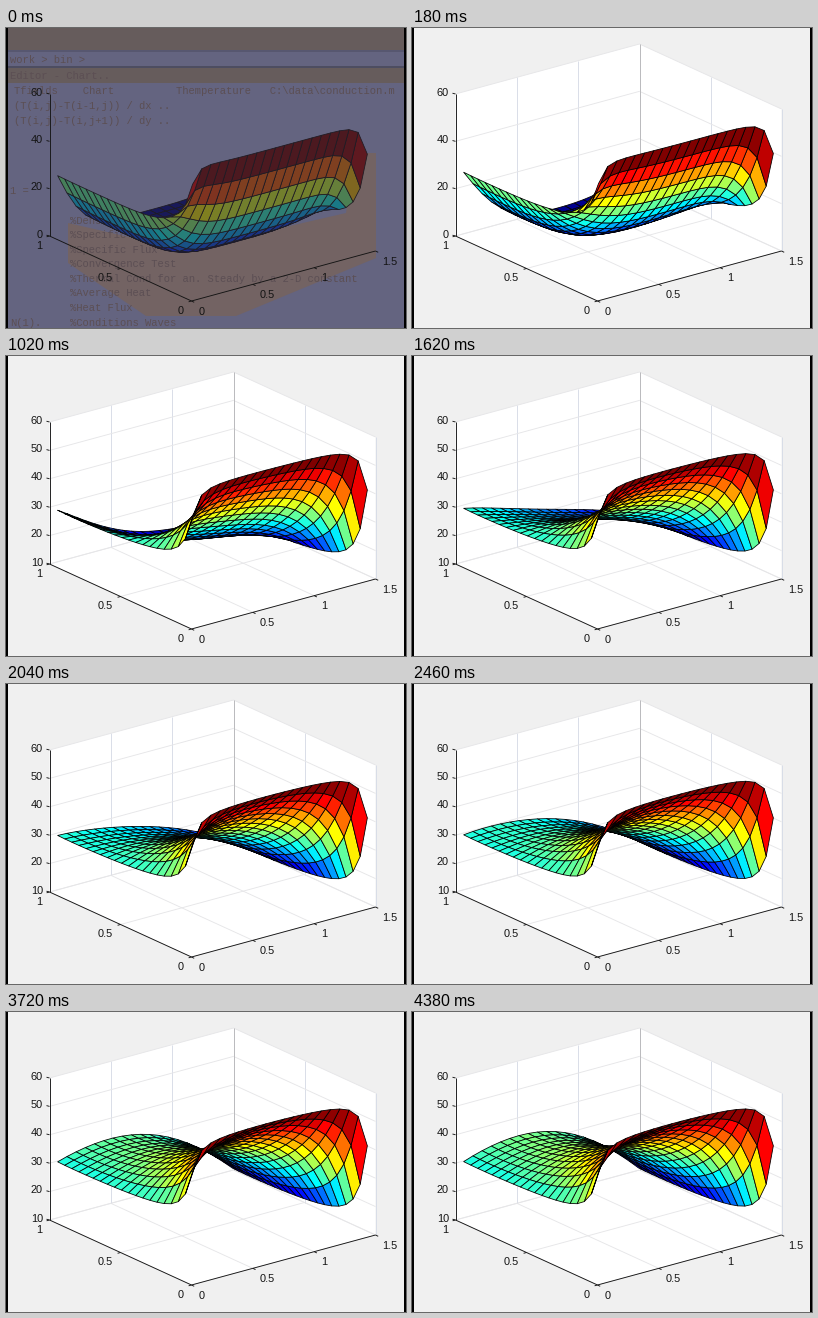
These frames come from a looping animation (400 px wide and 300 px high, 5.11 s). A matplotlib script:

```python
import numpy as np
import matplotlib.pyplot as plt
from matplotlib.animation import FuncAnimation
from matplotlib.collections import LineCollection, PolyCollection
from matplotlib.patches import Polygon, Rectangle

W, H, DPI = 400, 300, 100
LOOP_MS, TICK_MS, STEP_MS = 5110, 10, 60
STEPS = 74
PX = 72 / DPI

# Heat conduction in a 1.5 x 1 plate, cell-centred grid
N = 20
LX, LY = 1.5, 1.0
DX, DY = LX / N, LY / N
LEFT, RIGHT, FRONT, BACK_FLUX = 30, 10, 60, 4
SUBSTEPS, WARMUP = 20, 56
DT = 0.0071 / SUBSTEPS

xs = (np.arange(N) + 0.5) * DX
ys = (np.arange(N) + 0.5) * DY
X, Y = np.meshgrid(xs, ys, indexing="ij")


def diffuse(T, count):
    for _ in range(count):
        P = np.pad(T, 1)
        P[0, 1:-1] = 2 * LEFT - T[0]
        P[-1, 1:-1] = 2 * RIGHT - T[-1]
        P[1:-1, 0] = 2 * FRONT - T[:, 0]
        P[1:-1, -1] = T[:, -1] + BACK_FLUX * DY
        T = T + DT * ((P[2:, 1:-1] - 2 * T + P[:-2, 1:-1]) / DX**2
                      + (P[1:-1, 2:] - 2 * T + P[1:-1, :-2]) / DY**2)
    return T


def project(x, y, h=0):
    """Stage pixels; h is the height as a share of the z axis."""
    return np.stack(np.broadcast_arrays(
        185.5 + 184 * x / LX - 142 * y,
        273 - 50 * x / LX - 65 * y - 142 * h), axis=-1)


def jet(v):
    v = (np.minimum(np.floor(v * 64), 63) + 1) / 64
    return np.stack([np.clip(1.5 - abs(4 * v - c), 0, 1) for c in (3, 2, 1)], axis=-1)


def surface(T):
    low = 10 if T.min() > 9.5 else 0
    P = project(X, Y, (T - low) / (60 - low))
    quads = np.stack([P[:-1, :-1], P[1:, :-1], P[1:, 1:], P[:-1, 1:]], axis=2)
    colors = jet((T - T.min()) / (T.max() - T.min()))[:-1, :-1]
    # Far cells first
    return low, quads.reshape(-1, 4, 2)[::-1], colors.reshape(-1, 3)[::-1]


surfaces = []
field = diffuse(np.zeros((N, N)), WARMUP)
for _ in range(STEPS):
    surfaces.append(surface(field))
    field = diffuse(field, SUBSTEPS)

fig = plt.figure(figsize=(W / DPI, H / DPI), dpi=DPI)
ax = fig.add_axes([0, 0, 1, 1])
ax.set_xlim(0, W)
ax.set_ylim(H, 0)
ax.axis("off")

GRAY = (0.94, 0.94, 0.94)
DIM = np.array([100, 100, 128]) / 255
BROWN = (0.40, 0.36, 0.36)
GHOST = (0.36, 0.31, 0.33)
INK = (0.08, 0.08, 0.08)
GRID = (0.90, 0.90, 0.91)
UPRIGHT = (0.84, 0.86, 0.90)


def label(x, y, text, align):
    return ax.text(x, y, text, ha=align, va="center_baseline", color=INK,
                   family="Liberation Sans", size=11 * PX, zorder=6)


def lines(segments, color, zorder):
    return ax.add_collection(LineCollection(
        segments, colors=[color], linewidths=0.9 * PX, zorder=zorder))


def segment(a, b):
    return [project(*a), project(*b)]


backdrop = ax.add_patch(Rectangle((0, 0), W, H, color=GRAY, lw=0, zorder=0))
outline = [(0, 1, 0), (0, 1, 1), (LX, 1, 1), (LX, 0, 1), (LX, 0, 0), (0, 0, 0)]
pane = ax.add_patch(Polygon([project(*p) for p in outline], color="white", lw=0, zorder=1))
for x in (0, W - 2):
    ax.add_patch(Rectangle((x, 0), 2, H, color="black", lw=0, zorder=7))

floor, uprights = [], []
ticks = [segment((0, 1, 0), (0, 1, 1)), segment((0, 0, 0), (0, 1, 0)),
         segment((0, 0, 0), (LX, 0, 0))]
for x in (0.0, 0.5, 1.0, 1.5):
    floor.append(segment((x, 0, 0), (x, 1, 0)))
    uprights.append(segment((x, 1, 0), (x, 1, 1)))
    p = project(x, 0)
    ticks.append([p, p + (2.7, 1.3)])
    label(p[0] + 7, p[1] + 9.8, f"{x:g}", "left")
for y in (0.0, 0.5, 1.0):
    floor.append(segment((0, y, 0), (LX, y, 0)))
    uprights.append(segment((LX, y, 0), (LX, y, 1)))
    p = project(0, y)
    ticks.append([p, p + (-2.9, 0.8)])
    label(p[0] - 7.5, p[1] + 8.8, f"{y:g}", "right")
corner = segment((LX, 1, 0), (LX, 1, 1))
plot_only = [pane, lines(floor, GRID, 2), lines(uprights, UPRIGHT, 2),
             lines([corner], (0.72, 0.72, 0.73), 2.5)]
lines(ticks, INK, 3)

scales = {}
for low, values in ((0, range(0, 61, 20)), (10, range(10, 61, 10))):
    levels, marks, texts = [], [], []
    for value in values:
        h = (value - low) / (60 - low)
        levels += [segment((0, 1, h), (LX, 1, h)), segment((LX, 1, h), (LX, 0, h))]
        p = project(0, 1, h)
        marks.append([p, p + (-3, -0.8)])
        texts.append(label(37, p[1] - 2.5, str(value), "right"))
    scales[low] = (lines(levels, GRID, 2), [lines(marks, INK, 3)] + texts)

# Faint editor window behind the opening picture
ghosts = [ax.add_patch(Rectangle((0, y), W, h, color=c, lw=0, zorder=1))
          for y, h, c in ((0, 22, BROWN), (22, 2, (0.34, 0.34, 0.44)),
                          (38, 2, (0.30, 0.30, 0.38)), (40, 15, BROWN))]
shade = [(370, 125), (370, 230), (230, 288), (140, 288), (62, 235), (62, 195),
         (180, 222), (340, 185), (350, 125)]
ghosts.append(ax.add_patch(Polygon(shade, color=(0.45, 0.39, 0.39), lw=0, zorder=1)))
editor = [
    (4, 32, "work > bin >"), (4, 48, "Editor - Chart.."), (8, 63, "Tfields    Chart"),
    (170, 63, "Themperature   C:\\data\\conduction.m"),
    (8, 78, "(T(i,j)-T(i-1,j)) / dx .."), (8, 93, "(T(i,j)-T(i,j+1)) / dy .."),
    (4, 163, "1 ="), (64, 193, "%Density"), (64, 207, "%Specific Heat"),
    (64, 222, "%Specific Flux"), (64, 236, "%Convergence Test"),
    (64, 251, "%Thermal Cond for an. Steady by a 2-D constant"),
    (64, 265, "%Average Heat"), (64, 280, "%Heat Flux"),
    (64, 295, "%Conditions Waves"), (4, 295, "N(1)."),
]
ghosts += [ax.text(x, y, s, color=GHOST, family="Liberation Mono", size=10.5 * PX,
                   va="center", zorder=2, clip_on=True) for x, y, s in editor]

mesh = ax.add_collection(PolyCollection(
    surfaces[0][1], edgecolors="black", linewidths=0.8 * PX, zorder=5))


def draw(i):
    step = min(i * TICK_MS // STEP_MS, STEPS - 1)
    low, quads, colors = surfaces[step]
    opening = step == 0
    backdrop.set_color(DIM if opening else GRAY)
    mesh.set_verts(quads)
    mesh.set_facecolor(0.4 * colors + 0.25 * DIM if opening else colors)
    mesh.set_edgecolor((0.12, 0.11, 0.14) if opening else "black")
    for artist in plot_only:
        artist.set_visible(not opening)
    for artist in ghosts:
        artist.set_visible(opening)
    for base, (levels, marks) in scales.items():
        levels.set_visible(base == low and not opening)
        for artist in marks:
            artist.set_visible(base == low)
    return [mesh]


anim = FuncAnimation(fig, draw, frames=LOOP_MS // TICK_MS, interval=TICK_MS,
                     repeat=True, repeat_delay=0, blit=False)
plt.show()
```
